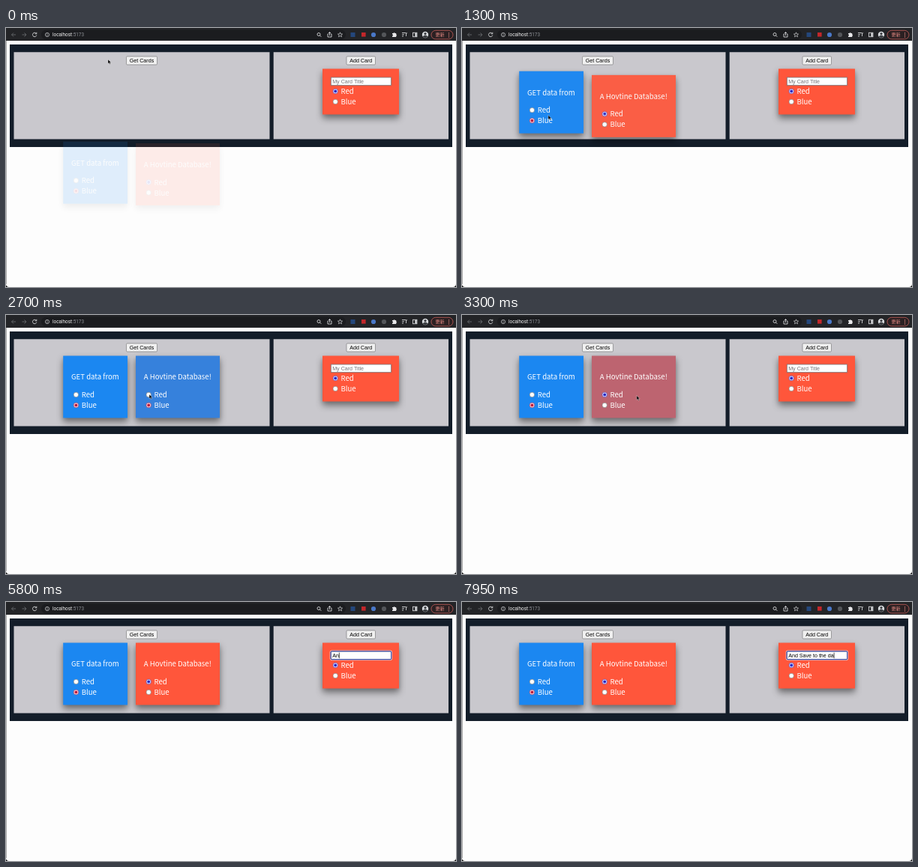
An HTML page that plays this animation: 600x346 px, repeating every 8 s.

```html
<!DOCTYPE html>
<html lang="en">
<head>
<meta charset="utf-8">
<title>Cards</title>
<style>
  html, body { margin: 0; height: 100%; overflow: hidden; background: #000; }
  svg { display: block; width: 600px; height: 346px; }
  text { font-family: "Liberation Sans", Arial, sans-serif; font-size: 7.11px; white-space: pre; }
  .card text { font-family: "Noto Sans CJK JP", "Noto Sans CJK SC", "Noto Sans", sans-serif; font-size: 9.6px; fill: #fff; }
  .card .face { filter: drop-shadow(0 5px 5px rgba(0, 0, 0, .42)) drop-shadow(0 2px 2px rgba(0, 0, 0, .12)); }
  .line { fill: none; stroke: #d5d6d9; stroke-width: .9; }
  .dim { stroke: #686a6e; }
</style>
</head>
<body>
<svg viewBox="0 0 600 346">
  <rect y="10" width="600" height="336" rx="4" fill="#fdfdfd"/>
  <rect width="600" height="17" fill="#232427"/>
  <rect x="47" y="2.5" width="406" height="13" rx="6.5" fill="#1b1c1f"/>
  <path d="M.3 17V342" stroke="#555" stroke-width=".6"/>

  <g class="line">
    <path class="dim" d="M13 9H7.5M10 6.5L7.5 9L10 11.5M21.5 9H27M24.5 6.5L27 9L24.5 11.5"/>
    <path d="M40.3 7.3A2.7 2.7 0 1 0 40.8 9.6M40.8 5.8V7.8H38.7"/>
    <circle cx="55" cy="9" r="2.6" stroke-width=".7"/><path d="M55 8.6V10.5M55 7.2V7.9" stroke-width=".7"/>
    <circle cx="417" cy="8.5" r="2"/><path d="M418.5 10L420.3 11.8"/>
    <path d="M430 8H429V12H434V8H433M431.5 10V5.5M430 7L431.5 5.5L433 7"/>
    <path d="M445.5 5.8L446.4 8L448.6 8.1L446.9 9.6L447.5 11.8L445.5 10.6L443.5 11.8L444.1 9.6L442.4 8.1L444.6 8Z" stroke-width=".7"/>
    <path d="M528 6.5H533M528 8.8H531M528 11H530M533.5 11V6.8H535"/>
    <rect x="542.5" y="6.3" width="5.4" height="5.4"/><path d="M546.5 6.5V11.5" stroke-width="2.4"/>
  </g>
  <rect x="459.5" y="6" width="6" height="6" fill="#24477c"/>
  <rect x="474" y="6" width="5.6" height="5.6" fill="#c3272b"/>
  <circle cx="490" cy="9" r="3.1" fill="#4a78c8"/>
  <circle cx="504" cy="9" r="3.1" fill="#54565a"/>
  <path d="M515 7H516.5A1.2 1.2 0 0 1 518.8 7H520.2V8.5A1.2 1.2 0 0 1 520.2 10.7V12H515V10.6A1.1 1.1 0 0 0 515 8.4Z" fill="#e8e8ea"/>
  <circle cx="559" cy="9" r="4.2" fill="#d9dcdf"/>
  <path d="M555.6 11.5Q559 7.5 562.4 11.5Q559 15 555.6 11.5" fill="#3b3e42"/><circle cx="559" cy="7.6" r="1.6" fill="#3b3e42"/>
  <rect x="567" y="3.3" width="29" height="11.6" rx="5.8" fill="#2b2022" stroke="#c75f5b" stroke-width=".8"/>
  <text x="572.5" y="11.3" fill="#ee8f88" style="font: 6px 'Noto Sans CJK JP', sans-serif">更新</text>
  <path d="M590.5 6.3V12.5" stroke="#ee8f88" stroke-width="1.1" stroke-dasharray="1.1 1.4"/>
  <text x="62" y="11.4" fill="#eee" style="font: 6.4px Roboto, sans-serif">localhost<tspan fill="#8d9095">:5173</tspan></text>

  <rect x="5" y="22" width="590" height="137" fill="#131d29"/>
  <path d="M10.5 32.3H351.5V148.5H10.5ZM356.7 32.3H590V148.5H356.7Z" fill="#c9c8cd"/>
  <g id="content"></g>
  <path id="cursor" d="M0 0V5.8L1.4 4.6L2.3 6.6L3.3 6.1L2.4 4.2H4.2Z" fill="#000" stroke="#fff" stroke-width=".35"/>
</svg>
<script>
const LOOP = 8000;
const BLUE = [27, 135, 241], RED = [255, 86, 59];
const TOP = 54.5;
const MESSAGE = 'And Save to the da';
const BLUE_CLICK = 2150, RED_CLICK = 2850, FOCUS = 5050, TYPING = 5650;
// time, x, y
const CURSOR_STOPS = [
  [750, 136, 42], [1250, 115, 116.5], [1450, 115, 116.5], [2050, 190, 120],
  [2300, 190, 120], [2600, 191, 106], [2950, 191, 106], [3800, 304, 110.5],
  [4200, 304, 110.5], [4900, 470, 70], [5150, 470, 70], [5450, 476, 92]
];
const $ = id => document.getElementById(id);
const clamp = v => Math.min(1, Math.max(0, v));
const smooth = v => (v = clamp(v), v * v * (3 - 2 * v));
const mix = (a, b, k) => a + (b - a) * k;
const rgb = (a, b, k) => `rgb(${a.map((v, i) => Math.round(mix(v, b[i], k)))})`;

const button = (x, width, label) => `
  <rect x="${x}" y="38" width="${width}" height="11" rx="1.2" fill="#f0f0f0" stroke="#6d6d70" stroke-width=".6"/>
  <text x="${x + width / 2}" y="46.1" text-anchor="middle">${label}</text>`;

const radio = (x, y, label) => `
  <circle class="ring" cx="${x}" cy="${y}" r="3.2" fill="#fff" stroke-width=".6"/>
  <circle class="dot" cx="${x}" cy="${y}" r="2"/>
  <text x="${x + 7.3}" y="${y + 3.6}">${label}</text>`;

const card = (id, x, width, height, radioY, body) => `
  <g id="${id}" class="card">
    <rect class="face" x="${x}" y="${TOP}" width="${width}" height="${height}"/>
    ${body}
    ${radio(x + 17.2, radioY, 'Red')}${radio(x + 17.2, radioY + 14, 'Blue')}
  </g>`;

const title = (x, label) => `<text x="${x}" y="86.3">${label}</text>`;

$('content').innerHTML =
  button(160.5, 41, 'Get Cards') + button(454, 38.5, 'Add Card') +
  card('first', 76.2, 85.8, 83, 106.5, title(87, 'GET data from')) +
  card('second', 173, 112, 83, 106.5, title(183.7, 'A Hovtine Database!')) +
  card('form', 422, 102, 61, 84.5, `
    <rect x="433.3" y="66" width="80.2" height="10.6" fill="#fff" stroke="#77777c" stroke-width=".8"/>
    <g id="focus" fill="none">
      <rect x="432.2" y="65" width="82.4" height="12.6" rx="1.8" stroke="#fff" stroke-width=".7"/>
      <rect x="433" y="65.8" width="80.8" height="11" rx="1.2" stroke="#2747b8" stroke-width="1"/>
    </g>
    <text id="field" x="435.2" y="73.9" style="font: 7.11px 'Liberation Sans', Arial, sans-serif"></text>
    <path id="caret" d="M0 67.6V75.2" stroke="#000" stroke-width=".7"/>`);

function paintCard(id, isBlue, blueness) {
  const accent = isBlue ? '#c0183c' : '#2a2bc8';
  const group = $(id);
  group.querySelector('.face').setAttribute('fill', rgb(RED, BLUE, blueness));
  group.querySelectorAll('.ring').forEach((ring, i) => {
    const checked = i === +isBlue;
    const dot = ring.nextElementSibling;
    ring.setAttribute('stroke', checked ? accent : '#767676');
    dot.setAttribute('fill', checked ? accent : 'none');
  });
}

function flyIn(id, t, duration) {
  const rest = (1 - clamp((t + 85) / duration)) ** 3;
  $(id).setAttribute('transform', `translate(0 ${111 * rest})`);
  $(id).setAttribute('opacity', 1 - rest);
}

function typedCount(t) {
  if (t < TYPING) return 0;
  return t < 7450 ? 1 + Math.floor((t - TYPING) / 150) : 13 + Math.floor((t - 7450) / 100);
}

function moveCursor(t) {
  const next = CURSOR_STOPS.findIndex(stop => stop[0] > t);
  const b = CURSOR_STOPS.at(next), a = next > 0 ? CURSOR_STOPS[next - 1] : b;
  const k = a === b ? 0 : smooth((t - a[0]) / (b[0] - a[0]));
  $('cursor').setAttribute('transform', `translate(${mix(a[1], b[1], k)} ${mix(a[2], b[2], k)})`);
  $('cursor').setAttribute('opacity', t < TYPING ? 1 : 0);
}

function draw(t) {
  flyIn('first', t, 2000);
  flyIn('second', t, 2400);
  paintCard('second', t >= BLUE_CLICK && t < RED_CLICK,
    smooth((t - BLUE_CLICK) / 700) * (1 - smooth((t - RED_CLICK) / 700)));

  const text = MESSAGE.slice(0, typedCount(t));
  const field = $('field');
  field.textContent = text || 'My Card Title';
  field.style.fill = text ? '#000' : '#75757a';
  const focused = t >= FOCUS;
  $('focus').setAttribute('opacity', +focused);
  $('caret').setAttribute('opacity', +focused);
  $('caret').setAttribute('transform', `translate(${435.6 + (text ? field.getComputedTextLength() : 0)} 0)`);
  moveCursor(t);
}

paintCard('first', true, 1);
paintCard('form', false, 0);
function tick() {
  draw(performance.now() % LOOP);
  requestAnimationFrame(tick);
}
tick();
</script>
</body>
</html>
```
